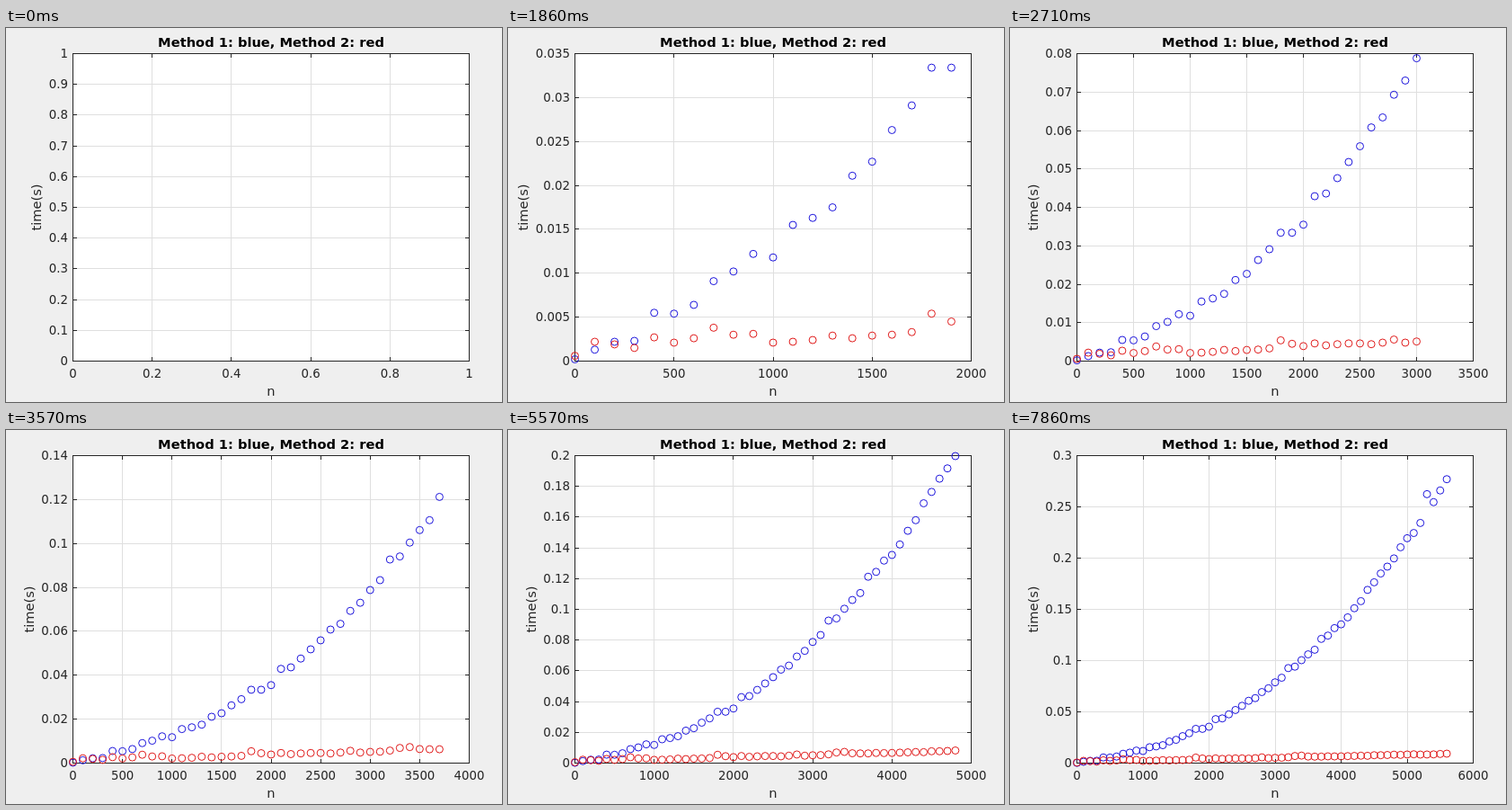
Animation of 552 by 416 pixels, one loop 8000 ms. Source, as an HTML page with a canvas:

```html
<!DOCTYPE html>
<html lang="en">
<head>
<meta charset="utf-8">
<title>Timing of two methods</title>
<style>
html, body { margin: 0; width: 100%; height: 100%; overflow: hidden; background: #efefef; }
canvas { display: block; }
</style>
</head>
<body>
<canvas id="stage" width="552" height="416"></canvas>
<script>
const ctx = document.getElementById('stage').getContext('2d');
const LOOP = 8000, FPS = 7;
const L = 74.5, R = 515.5, T = 28.5, B = 370.5;
const FACE = '"DejaVu Sans", sans-serif';
const TICK = '13.33px ' + FACE, LABEL = '14.67px ' + FACE;

// Run times in units of 0.1 ms, for n = 0, 100, 200, ...
const blue = [
  2, 13, 22, 23, 55, 54, 64, 91, 102, 122, 118, 155, 163, 175, 211, 227, 263, 291, 334, 334,
  355, 429, 436, 476, 518, 559, 608, 634, 693, 730, 788, 833, 927, 941, 1004, 1061, 1106, 1212,
  1244, 1317, 1354, 1422, 1511, 1580, 1690, 1764, 1850, 1917, 1997, 2106, 2194, 2245,
  2343, 2624, 2546, 2660, 2770];
const red = [
  6, 22, 19, 15, 27, 21, 26, 38, 30, 31, 21, 22, 24, 29, 26, 29, 30, 33, 54, 45,
  39, 46, 41, 44, 46, 46, 44, 48, 56, 48, 51, 52, 57, 69, 73, 64, 63, 63,
  66, 65, 66, 68, 70, 72, 71, 77, 77, 79, 82, 80, 84, 86, 83, 84, 85, 89, 92];

// A point appears once both methods have run and the plot has been redrawn.
const START = 1124.5, REDRAW = 17;
let clock = START;
const shownAt = blue.map((b, i) => clock += (b + red[i]) / 10 + REDRAW);

// Smallest 1-2-5 step that needs at most `most` intervals.
function autoScale(max, most, beyond) {
  for (let p = 1; ; p *= 10) {
    for (const m of [1, 2, 5]) {
      const step = m * p;
      const count = beyond ? Math.floor(max / step) + 1 : Math.ceil(max / step);
      if (count <= most) return { lo: 0, hi: count * step, step };
    }
  }
}

function scaleX(count) {
  if (count === 0) return { lo: 0, hi: 1, step: 0.2 };
  if (count === 1) return { lo: -1, hi: 1, step: 0.5 };
  return autoScale((count - 1) * 100, 9, true);
}

function ticks({ lo, hi, step }) {
  const n = Math.round((hi - lo) / step);
  return Array.from({ length: n + 1 }, (_, i) => lo + i * step);
}

const snap = v => Math.round(v - 0.5) + 0.5;
const tidy = v => String(+v.toFixed(5));

function line(x1, y1, x2, y2, color) {
  ctx.strokeStyle = color;
  ctx.beginPath();
  ctx.moveTo(x1, y1);
  ctx.lineTo(x2, y2);
  ctx.stroke();
}

function text(str, x, y, font, align = 'center', color = '#262626') {
  ctx.font = font;
  ctx.textAlign = align;
  ctx.fillStyle = color;
  ctx.fillText(str, x, y);
}

function ring(x, y, color) {
  ctx.strokeStyle = color;
  ctx.beginPath();
  ctx.arc(x, y, 4, 0, Math.PI * 2);
  ctx.stroke();
}

function draw(time) {
  const count = shownAt.filter(t => t <= time).length;
  const max = count ? Math.max(...blue.slice(0, count), ...red.slice(0, count)) : 10000;
  const sx = scaleX(count), sy = autoScale(max, 10, false);
  const px = v => L + (v - sx.lo) / (sx.hi - sx.lo) * (R - L);
  const py = v => B - v / sy.hi * (B - T);
  const xs = ticks(sx), ys = ticks(sy);

  ctx.fillStyle = '#efefef';
  ctx.fillRect(0, 0, 552, 416);
  ctx.fillStyle = '#fff';
  ctx.fillRect(L, T, R - L, B - T);
  ctx.lineWidth = 1;

  for (const v of xs) line(snap(px(v)), T, snap(px(v)), B, '#dfdfdf');
  for (const v of ys) line(L, snap(py(v)), R, snap(py(v)), '#dfdfdf');

  ctx.strokeStyle = '#262626';
  ctx.strokeRect(L, T, R - L, B - T);

  for (const v of xs) {
    const x = snap(px(v));
    line(x, B, x, B - 4.5, '#262626');
    line(x, T, x, T + 4.5, '#262626');
    text(tidy(v), px(v), 389, TICK);
  }

  // Small values share a power of ten above the axis.
  const power = sy.hi <= 100 ? Math.floor(Math.log10(max)) - 4 : 0;
  let widest = 0;
  for (const v of ys) {
    const y = snap(py(v)), str = tidy(v / 10 ** (4 + power));
    line(L, y, L + 4.5, y, '#262626');
    line(R, y, R - 4.5, y, '#262626');
    text(str, 69, y + 4.5, TICK, 'right');
    widest = Math.max(widest, ctx.measureText(str).width);
  }
  if (power) {
    text('×10', 74, 24, TICK, 'left');
    text('-' + -power, 75 + ctx.measureText('×10').width, 17, '10.67px ' + FACE, 'left');
  }

  text('Method 1: blue, Method 2: red', 295, 21, 'bold ' + LABEL, 'center', '#000');
  text('n', 295, 409, LABEL);
  ctx.save();
  ctx.translate(Math.round(60.6 - widest), 199.5);
  ctx.rotate(-Math.PI / 2);
  text('time(s)', 0, 0, LABEL);
  ctx.restore();

  for (let i = 0; i < count; i++) {
    ring(px(i * 100), py(blue[i]), '#1c14dc');
    ring(px(i * 100), py(red[i]), '#e01a1a');
  }
}

function tick(now) {
  const frame = Math.floor((now % LOOP) * FPS / 1000 + 0.03);
  draw(frame * 1000 / FPS);
  requestAnimationFrame(tick);
}
draw(0);
requestAnimationFrame(tick);
</script>
</body>
</html>
```
